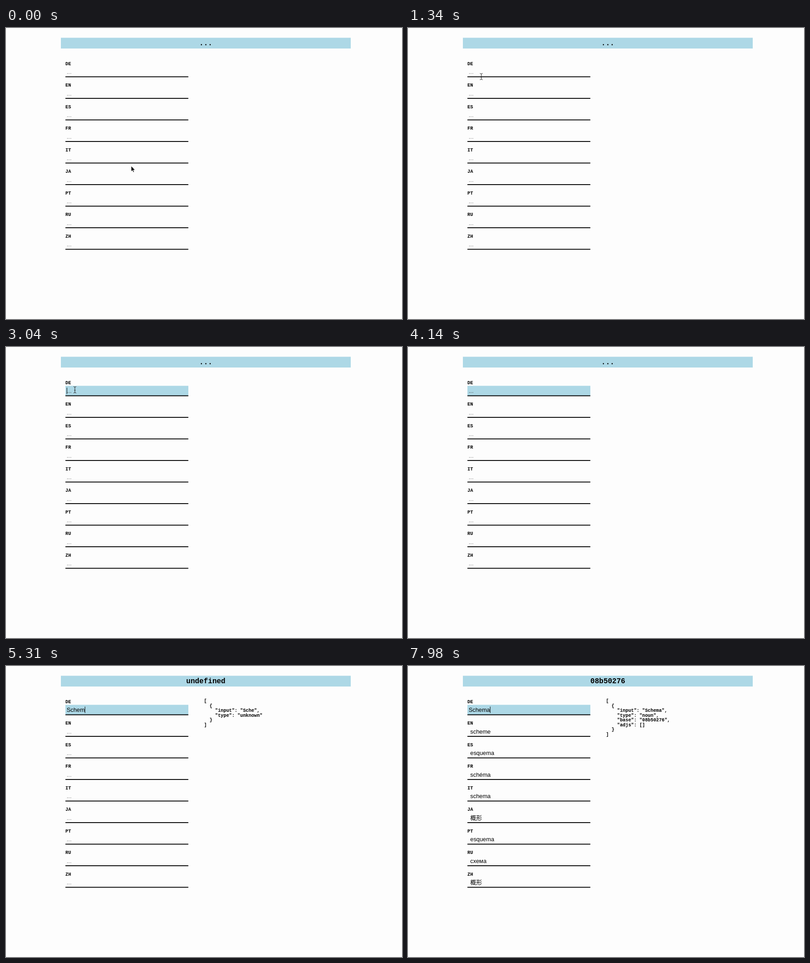
An HTML page that plays this animation: 873x641 px, repeating every 8000 ms.

```html
<!DOCTYPE html>
<html>
<head>
<meta charset="utf-8">
<style>
html, body { margin: 0; width: 100%; height: 100%; overflow: hidden; background: #fdfdfd; }
svg { display: block; }
text { white-space: pre; }
.mono { font: bold 10.24px "Liberation Mono", "Courier New", monospace; }
.title { font-size: 16px; text-anchor: middle; }
.word { font: 12.8px "Liberation Sans", "Noto Sans CJK JP", "Noto Sans CJK", sans-serif; }
</style>
</head>
<body>
<svg id="stage" width="873" height="641" viewBox="0 0 873 641"></svg>
<script>
const LOOP = 8000, PITCH = 47.5, TEXT_X = 133.8;
const stage = document.getElementById('stage');

function add(tag, attrs, text = '') {
  const el = document.createElementNS('http://www.w3.org/2000/svg', tag);
  for (const k in attrs) el.setAttribute(k, attrs[k]);
  el.textContent = text;
  return stage.appendChild(el);
}
const setText = (el, s) => { if (el.textContent !== s) el.textContent = s; };
const ramp = (t, a, b) => Math.min(1, Math.max(0, (t - a) / (b - a)));
const ease = p => p * p * (3 - 2 * p);
const mix = (a, b, p) => a + (b - a) * p;

add('rect', { x: 121, y: 21.5, width: 639, height: 23.7, fill: 'lightblue' });
const title = add('text', { x: 440.5, y: 38, class: 'mono title' });
const focus = add('rect', { x: 131, y: 85.5, width: 271, height: 21.5, fill: 'lightblue' });

const words = { DE: '', EN: 'scheme', ES: 'esquema', FR: 'schéma', IT: 'schema',
  JA: '概形', PT: 'esquema', RU: 'схема', ZH: '概形' };
const fields = Object.keys(words).map((lang, i) => {
  const y = i * PITCH;
  add('text', { x: 131, y: 81.5 + y, class: 'mono' }, lang);
  add('rect', { x: 131, y: 106.5 + y, width: 271, height: 1.9 });
  return add('text', { x: TEXT_X, y: 101.4 + y, class: 'word' });
});
const json = Array.from({ length: 8 }, (_, i) =>
  add('text', { x: 436.5, y: 80 + i * 10.57, class: 'mono' }));
const caret = add('rect', { y: 89.5, width: 1, height: 14 });
const arrow = add('path', { d: 'M0 0V12.2L2.8 9.6 4.6 13.9 6.5 13.1 4.7 8.9H8.5Z',
  stroke: '#fff', 'stroke-width': 0.8 });
const beam = add('path', { d: 'M-3-7Q0-7 0-5Q0-7 3-7M0-5V5M-3 7Q0 7 0 5Q0 7 3 7M-1.5 1H1.5',
  fill: 'none', stroke: '#222' });

// When each letter is typed, and when its lookup result arrives
const typed = [4200, 4440, 4680, 4940, 5180, 5440];
const found = [4460, 4700, 4920, 5140, 5430, 5600];
const count = (times, t) => times.filter(at => t >= at).length;

function resultLines(n) {
  if (!n) return [];
  const item = { input: 'Schema'.slice(0, n), type: 'unknown' };
  if (n === 6) Object.assign(item, { type: 'noun', base: '08b50276', adjs: [] });
  return JSON.stringify([item], null, 2).split('\n');
}

function drawPointer(t) {
  const a = ease(ramp(t, 0, 820)), b = ease(ramp(t, 2480, 3200));
  const x = mix(276, 161.5, a) - 11 * b;
  const y = mix(304, 107, a) - 14.5 * b;
  const inField = (y - 85.5) % PITCH < 20.5 && y > 85.5;
  const isBeam = t >= 960 || inField;
  arrow.setAttribute('opacity', isBeam ? 0 : 1);
  beam.setAttribute('opacity', isBeam ? 1 - ramp(t, 3590, 3740) : 0);
  for (const el of [arrow, beam]) el.setAttribute('transform', `translate(${x} ${y})`);
}

function draw(t) {
  const n = count(typed, t), m = count(found, t), done = m === 6;
  setText(title, done ? '08b50276' : m ? 'undefined' : '...');
  fields.forEach((el, i) => {
    const s = i ? (done ? ' ' + Object.values(words)[i] : '') : 'Schema'.slice(0, n);
    setText(el, s || '...');
    el.setAttribute('fill', s ? '#000' : !i && t > 1760 ? '#444' : '#757575');
  });
  const lines = resultLines(m);
  json.forEach((el, i) => setText(el, lines[i] || ''));

  focus.setAttribute('opacity', ease(ramp(t, 1740, 2080)));
  const shown = t < 3300 ? +(t >= 1760) : t < 7000 ? (n ? 1 - ramp(t, 6040, 6200) : 0) : ramp(t, 7560, 7720);
  caret.setAttribute('x', TEXT_X + (n ? fields[0].getComputedTextLength() : 0));
  caret.setAttribute('opacity', shown);
  drawPointer(t);
}

function tick() {
  draw(performance.now() % LOOP);
  requestAnimationFrame(tick);
}
tick();
</script>
</body>
</html>
```
